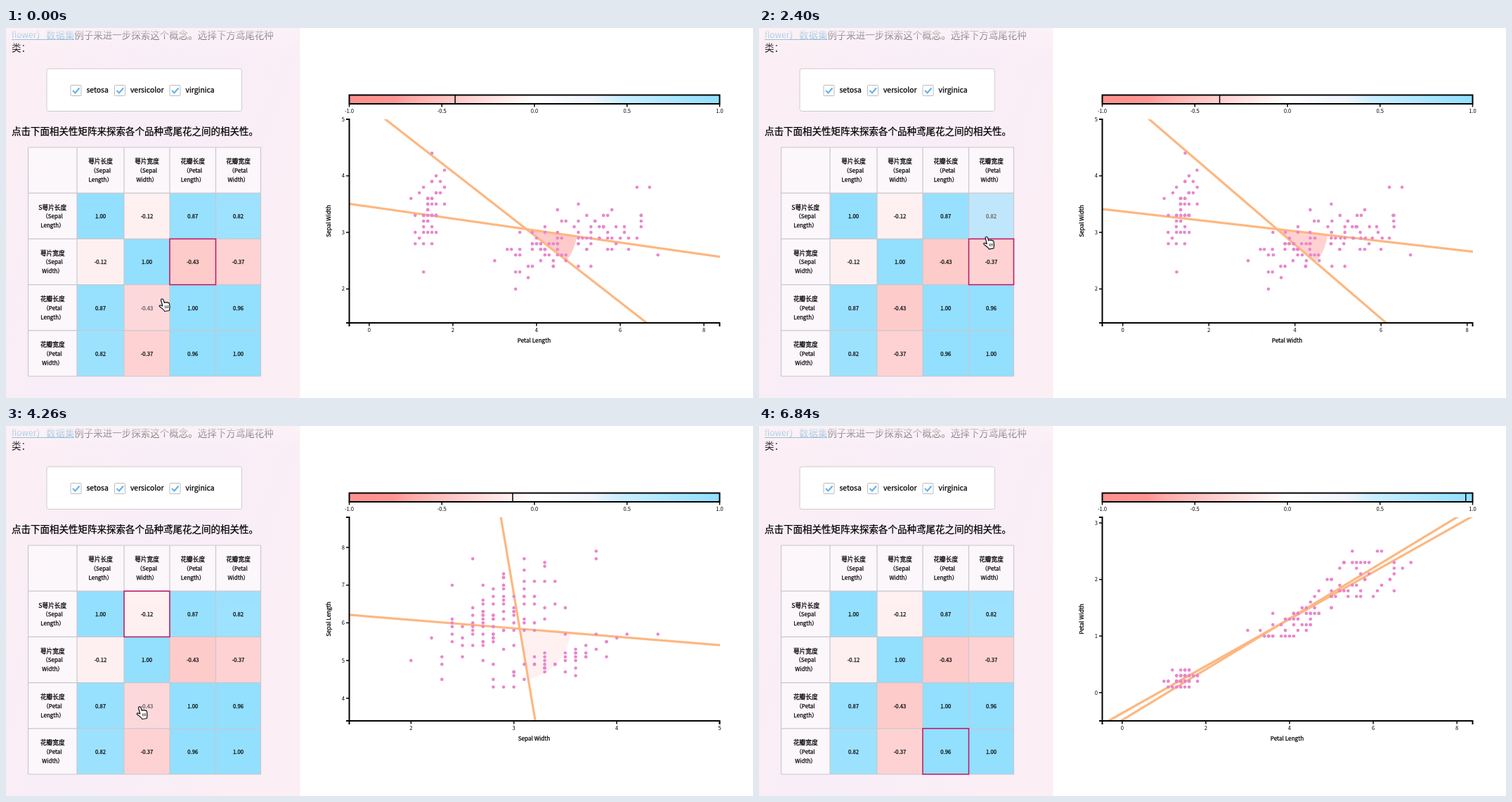
Recreate the animation shown at these times as an HTML page. Size 1063x527 px, loop 6.96 s.

```html
<!DOCTYPE html>
<html lang="zh-CN">
<head>
<meta charset="utf-8">
<style>
html, body { margin: 0; width: 100%; height: 100%; overflow: hidden; background: #fff }
svg { display: block; font-family: "Noto Sans CJK SC", "Noto Sans", sans-serif }
text { fill: #000; text-anchor: middle }
.start { text-anchor: start }
.end { text-anchor: end }
.medium { stroke: #000; stroke-width: .25 }
.link { text-anchor: start; fill: #2f93c0 }
.axis { fill: none; stroke: #000; stroke-width: 2 }
.tick { stroke: #000; stroke-width: 1.5 }
</style>
</head>
<body>
<svg width="1063" height="527" viewBox="0 0 1063 527">
  <defs>
    <linearGradient id="panel" x2="1" y2=".4">
      <stop stop-color="#fceef4"/><stop offset=".55" stop-color="#f8eef8"/><stop offset="1" stop-color="#fbeef5"/>
    </linearGradient>
    <linearGradient id="fade" x2="0" y2="1">
      <stop stop-color="#fbf2f7" stop-opacity=".9"/><stop offset="1" stop-color="#fbf2f7" stop-opacity="0"/>
    </linearGradient>
    <linearGradient id="scale">
      <stop stop-color="#ff908e"/><stop offset=".12" stop-color="#ff9592"/><stop offset=".17" stop-color="#ffabaa"/>
      <stop offset=".5" stop-color="#fff"/><stop offset=".66" stop-color="#eff4fd"/>
      <stop offset=".73" stop-color="#caefff"/><stop offset="1" stop-color="#8fdfff"/>
    </linearGradient>
    <clipPath id="plot"><path d="M488.500 130H1016V420H488.500z"/></clipPath>
    <clipPath id="right"><path d="M419 0H1063V527H419z"/></clipPath>
  </defs>
  <g id="still"></g>
  <g id="live"></g>
</svg>
<script>
const LOOP = 6960, DURATION = 300, TRAVEL = 240, REST = 230;
const SL = 0, SW = 1, PL = 2, PW = 3;
const LEFT = 488.5, RIGHT = 1015.5, TOP = 130, BOTTOM = 420;

const vars = [
  { name: 'Sepal Length', zh: '萼片长度', min: 4.3, max: 7.9, mean: 5.843, sd: .828, step: 1 },
  { name: 'Sepal Width', zh: '萼片宽度', min: 2, max: 4.4, mean: 3.057, sd: .436, step: 1 },
  { name: 'Petal Length', zh: '花瓣长度', min: 1, max: 6.9, mean: 3.758, sd: 1.765, step: 2 },
  { name: 'Petal Width', zh: '花瓣宽度', min: .1, max: 2.5, mean: 1.199, sd: .762, step: 1 }
];
const pairs = { '01': -.1176, '02': .8718, '03': .8179, '12': -.4284, '13': -.3661, '23': .9629 };
const corr = (a, b) => a == b ? 1 : pairs[[a, b].sort().join('')];

// Each click: time, row, column and pointer tip; the last stop leaves the stage.
const tour = [
  [-LOOP, SW, PL, 222, 386], [45, PL, SW, 222, 386], [915, PL, PL, 254, 389], [1725, SW, PL, 262, 345],
  [2350, SW, PW, 325, 307], [2820, SL, PW, 318, 262], [3190, SL, PL, 296, 252], [3530, SL, SW, 205, 262],
  [4300, PL, SW, 190, 400], [4620, PW, SL, 130, 455], [5640, PW, SW, 205, 462], [6230, PW, PL, 278, 464],
  [LOOP + 40, PW, PL, 262, 545]
];

const lerp = (a, b, p) => a + (b - a) * p;
const clamp = (v, a, b) => Math.min(b, Math.max(a, v));
const ease = t => t < .5 ? 4 * t ** 3 : 1 - 4 * (1 - t) ** 3;

// Three species as correlated clusters, with a few flowers that set the extremes.
const species = [
  { mean: [5.01, 3.43, 1.46, .24], sd: [.34, .34, .17, .1], load: [.87, .85, .3, .3] },
  { mean: [5.94, 2.77, 4.26, 1.33], sd: [.5, .3, .46, .19], load: [.78, .68, .93, .82] },
  { mean: [6.55, 2.97, 5.5, 2.03], sd: [.58, .3, .52, .26], load: [.95, .5, .9, .4] }
];
const flowers = [
  [5.7, 4.4, 1.5, .4], [4.3, 3, 1.1, .1], [4.5, 2.3, 1.3, .3], [4.6, 3.6, 1, .2], [5, 2, 3.5, 1],
  [5.1, 2.5, 3, 1.1], [7.9, 3.8, 6.4, 2], [7.7, 3.8, 6.7, 2.2], [7.7, 2.6, 6.9, 2.3]
];
let seed = 11;
const rand = () => (seed = seed * 16807 % 2147483647) / 2147483647;
const normal = () => (rand() + rand() + rand() + rand() - 2) * 1.73;
for (const { mean, sd, load } of species)
  for (let i = 0; i < 47; i++) {
    const size = normal();
    flowers.push(vars.map(({ min, max }, k) => {
      const z = load[k] * size + Math.sqrt(1 - load[k] ** 2) * normal();
      return Math.round(clamp(mean[k] + sd[k] * clamp(z, -2, 2), min, max) * 10) / 10;
    }));
  }

const unit = (k, v) => {
  const { min, max } = vars[k], pad = (max - min) / 4;
  return (v - min + pad) / (max - min + 2 * pad);
};
const xOf = (k, v) => lerp(LEFT, RIGHT, unit(k, v));
const yOf = (k, v) => lerp(BOTTOM, TOP, unit(k, v));
const barX = r => 752 + 263.5 * r;
function colour(r) {
  const end = r < 0 ? [255, 143, 143] : [143, 223, 255];
  return `rgb(${end.map(c => Math.round(lerp(255, c, Math.min(1, 1.1 * Math.abs(r)))))})`;
}

// y is the middle of the line
const text = (x, y, s, size, kind = '', attrs = '') =>
  `<text x="${x}" y="${y + size * .37}" font-size="${size}" class="${kind}" ${attrs}>${s}</text>`;
const path = (d, attrs) => `<path d="${d}" ${attrs}/>`;

const colX = [31.5, 101, 168, 233, 298.5, 362.5];
const rowY = colX.map((_, i) => 170 + 65.2 * i);
const mid = (edges, i) => (edges[i] + edges[i + 1]) / 2;
const cellBox = (r, c, attrs) =>
  `<rect x="${colX[c]}" y="${rowY[r]}" width="${colX[c + 1] - colX[c]}" height="${rowY[r + 1] - rowY[r]}" ${attrs}/>`;

function heading(r, c, k) {
  const x = mid(colX, c), y = mid(rowY, r) + .5, [a, b] = vars[k].name.split(' ');
  return text(x, y - 13, (r && !k ? 'S' : '') + vars[k].zh, 8.7, 'medium') +
    text(x, y, '（' + a, 8, 'medium') + text(x, y + 13, b + '）', 8, 'medium');
}

function drawStill() {
  let s = '<rect width="418.500" height="527" fill="url(#panel)"/>' +
    text(8, 10, 'flower', 12, 'link') + text(43, 10, '）', 13.5, 'link') + text(57, 10, '数据集', 13.5, 'link') +
    path('M8 16.500H97', 'stroke="#2f93c0"') +
    text(97.3, 10, '例子来进一步探索这个概念。选择下方鸢尾花种', 13.5, 'start') +
    text(8, 28, '类：', 13.5, 'start') +
    '<rect width="418" height="36" fill="url(#fade)"/>' +
    '<rect x="58" y="58" width="277.500" height="60.500" rx="3" fill="#fff" stroke="#ccc"/>';
  [[92, 'setosa'], [154.5, 'versicolor'], [233, 'virginica']].forEach(([x, name]) => {
    s += `<rect x="${x}" y="81.500" width="15" height="15" rx="1" fill="#fff" stroke="#bbb"/>` +
      path(`M${x + 3} 89l3.500 3.500 6-7`, 'fill="none" stroke="#62b4ec" stroke-width="2.200"') +
      text(x + 22.5, 88.5, name, 10.4, 'start medium');
  });
  s += text(8, 147, '点击下面相关性矩阵来探索各个品种鸢尾花之间的相关性。', 13.5, 'start medium');
  for (let i = 0; i < 5; i++) {
    s += cellBox(0, i, 'fill="#fff" fill-opacity=".55"');
    if (i) s += cellBox(i, 0, 'fill="#fff" fill-opacity=".55"') + heading(0, i, i - 1) + heading(i, 0, i - 1);
  }
  s += `<rect x="${LEFT}" y="95.500" width="527" height="12.500" fill="url(#scale)" stroke="#000" stroke-width="2"/>`;
  for (let r = -1; r <= 1; r += .5)
    s += path(`M${barX(r)} 108v4.500`, 'class="tick"') + text(barX(r), 118, r.toFixed(1), 7.6);
  document.getElementById('still').innerHTML = s;
}

// The pointer sets off after the previous click and rests a little before the next one.
function pointerAt(t) {
  const i = tour.findIndex(stop => stop[0] > t);
  const [before, , , x0, y0] = tour[i - 1], [click, , , x1, y1] = tour[i];
  const p = clamp((t - Math.max(before, click - REST - TRAVEL)) / TRAVEL, 0, 1);
  return [lerp(x0, x1, p), lerp(y0, y1, p)];
}

function drawTable(row, col, px, py) {
  let s = '';
  for (let r = 1; r < 5; r++)
    for (let c = 1; c < 5; c++) {
      const v = corr(r - 1, c - 1), hot = px + 4;
      const inside = hot > colX[c] && hot < colX[c + 1] && py > rowY[r] && py < rowY[r + 1];
      const dim = inside && !(r - 1 == row && c - 1 == col);
      s += `<g opacity="${dim ? .6 : .97}">` + cellBox(r, c, `fill="${colour(v)}"`) +
        text(mid(colX, c), mid(rowY, r) + .5, v.toFixed(2), 7.7, 'medium') + '</g>';
    }
  s += path(colX.map(x => `M${x} 170V496`).join('') + rowY.map(y => `M31.500 ${y}H362.500`).join(''),
    'fill="none" stroke="#c8c8cc" stroke-width="1.200"');
  return s + cellBox(row + 1, col + 1, 'fill="none" stroke="#bd1766" stroke-width="1.500"');
}

function ticksOf(k) {
  const list = [];
  for (let v = 0; v < 10; v += vars[k].step)
    if (Math.abs(unit(k, v) - .5) < .500001) list.push(v);
  return list;
}

// Ticks slide from the old scale to the new; leavers fade out, newcomers fade in.
function drawTicks(from, to, p, place, mark) {
  const old = ticksOf(from), now = ticksOf(to);
  return [...new Set([...old, ...now])].map(v => {
    const alpha = !now.includes(v) ? 1 - p : !old.includes(v) ? p : 1;
    return alpha < .01 ? '' : `<g opacity="${alpha}">${mark(lerp(place(from, v), place(to, v), p), v)}</g>`;
  }).join('');
}

function drawChart(row0, col0, row, col, p) {
  const r = corr(row, col);
  const cx = xOf(col, vars[col].mean), cy = yOf(row, vars[row].mean);
  const sx = xOf(col, vars[col].sd) - xOf(col, 0), sy = yOf(row, vars[row].sd) - yOf(row, 0);
  const [a, b] = [Math.atan(r * sy / sx), Math.atan(sy / (r * sx))];
  const at = (angle, d) => `${cx + d * Math.cos(angle)} ${cy + d * Math.sin(angle)}`;
  let s = '<g clip-path="url(#plot)">' +
    path(`M${cx} ${cy}L${at(a, 72.5)}A72.500 72.500 0 0 ${+(b > a)} ${at(b, 72.5)}z`, `fill="${colour(r)}"`) +
    [a, b].map(g => path(`M${at(g, -900)}L${at(g, 900)}`, 'stroke="#fdb780" stroke-width="3.200"')).join('') + '</g>';
  s += '<g fill="#ea86cb">' + flowers.map(f => {
    const x = lerp(xOf(col0, f[col0]), xOf(col, f[col]), p);
    const y = lerp(yOf(row0, f[row0]), yOf(row, f[row]), p);
    return `<circle cx="${x.toFixed(1)}" cy="${y.toFixed(1)}" r="2.300"/>`;
  }).join('') + '</g>';
  s += path(`M${LEFT} 425V${BOTTOM}H${RIGHT}V425M484 ${TOP}H${LEFT}V${BOTTOM}H484`, 'class="axis"');
  s += drawTicks(col0, col, p, xOf, (x, v) =>
    path(`M${x} 420v4.500`, 'class="tick"') + text(x, 430.5, v, 7.6));
  s += drawTicks(row0, row, p, yOf, (y, v) =>
    path(`M${LEFT} ${y}h-4.500`, 'class="tick"') + text(482, y, v, 7.6, 'end'));
  s += text(751.5, 445, vars[col].name, 8.2, 'medium') +
    text(0, 0, vars[row].name, 8.2, 'medium', 'transform="translate(459 275)rotate(-90)"') +
    path(`M${barX(r)} 95v13`, 'class="tick"');
  return `<g clip-path="url(#right)">${s}</g>`;
}

const drawHand = (x, y) => `<g transform="translate(${x} ${y})" stroke="#111" stroke-linejoin="round">` +
  path('M-1.500 1.500C-1.500-.5 1-.8 1.800 1L3.500 5.500C4.200 4.200 5.700 4.400 6.200 5.300C7 4.300 8.200 4.600 8.600 5.600' +
    'C9.400 5 10.300 5.600 10.500 7L11 11C11.200 13 10.600 14 10.400 16.500L3.800 17.500C3 15.500 0 13.500-3 11' +
    'C-4.800 9.300-3 8.300-1 9.200L.8 10z', 'fill="#fff" stroke-width="1.200"') +
  path('M4.400 9.500l.3 4M6.500 9.300l.3 4M8.600 9.200l.2 4', 'fill="none" stroke-width=".8"') + '</g>';

const live = document.getElementById('live');
function frame() {
  const t = performance.now() % LOOP;
  const i = tour.findIndex(stop => stop[0] > t) - 1;
  const [start, row, col] = tour[i], [, row0, col0] = tour[Math.max(0, i - 1)];
  const p = ease(clamp((t - start) / DURATION, 0, 1));
  const [px, py] = pointerAt(t);
  live.innerHTML = drawChart(row0, col0, row, col, p) + drawTable(row, col, px, py) + drawHand(px, py);
  requestAnimationFrame(frame);
}
drawStill();
frame();
</script>
</body>
</html>
```
